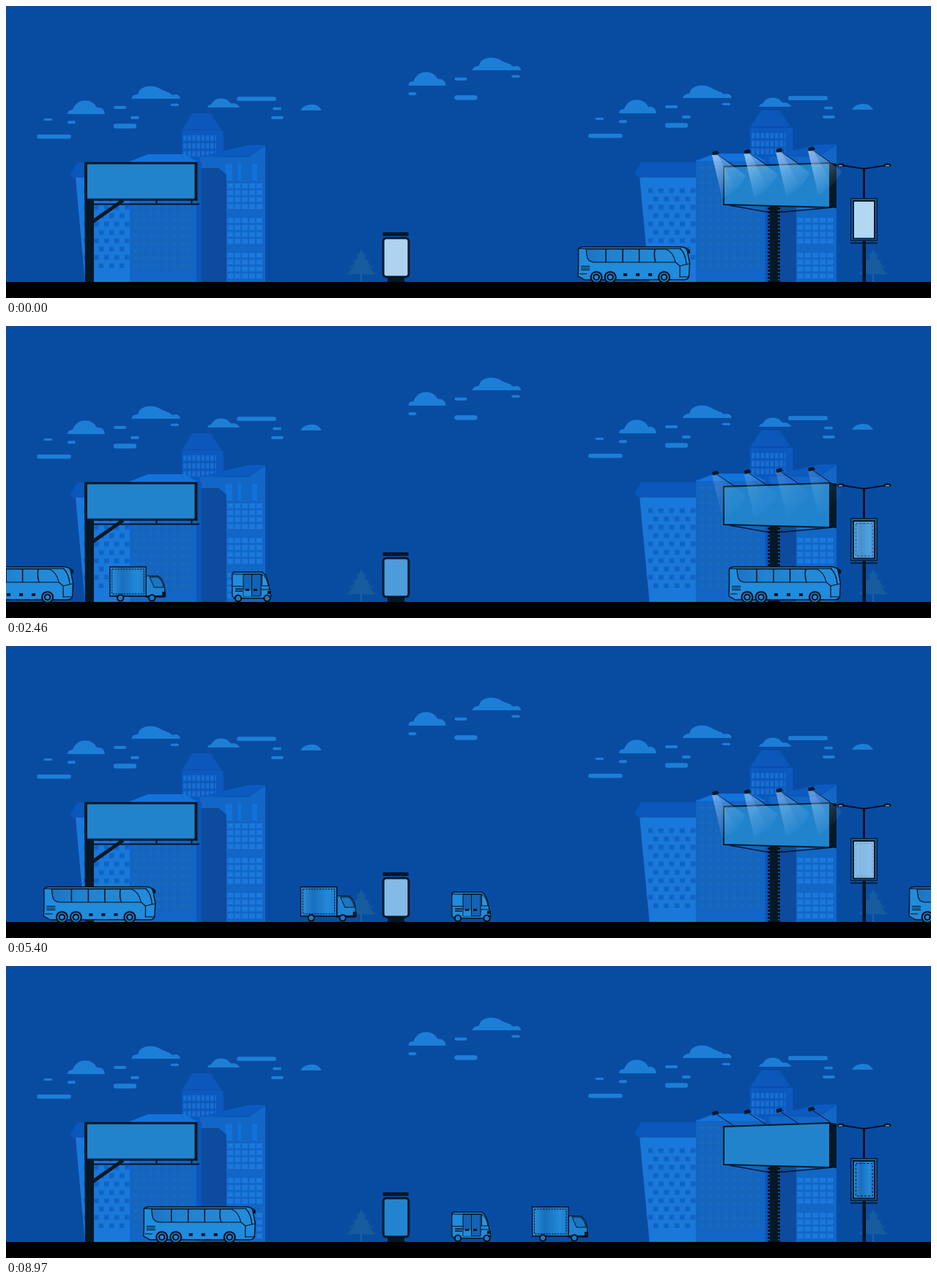
These frames come from a looping animation (1263 px wide and 400 px high, 9 s). An HTML page:

```html
<!DOCTYPE html>
<html lang="en">
<head>
<meta charset="utf-8">
<title>City street</title>
<style>
html, body { margin: 0; width: 100%; height: 100%; overflow: hidden; background: #084ca2; }
svg { display: block; width: 100vw; height: 100vh; }
.line { fill: none; stroke: #03111f; }
.dark { fill: #041825; }
</style>
</head>
<body>
<svg viewBox="0 0 1263 400">
<defs>
  <linearGradient id="panel">
    <stop offset="0" stop-color="#2a92e0"/><stop offset=".35" stop-color="#196fbd"/>
    <stop offset=".75" stop-color="#2389d8"/><stop offset="1" stop-color="#1d7ccb"/>
  </linearGradient>
  <linearGradient id="glass">
    <stop offset="0" stop-color="#1b74c3"/><stop offset=".3" stop-color="#1f82d2"/>
    <stop offset="1" stop-color="#238bdb"/>
  </linearGradient>
  <linearGradient id="ray" x1="0" y1="0" x2=".5" y2="1">
    <stop offset="0" stop-color="#d5ebff" stop-opacity=".48"/>
    <stop offset=".6" stop-color="#b5dcfa" stop-opacity=".2"/>
    <stop offset="1" stop-color="#a5d4f8" stop-opacity=".03"/>
  </linearGradient>
  <pattern id="stagger" x="106" y="250" width="14" height="22.800" patternUnits="userSpaceOnUse">
    <path d="M0 0h6.500v6.500H0zM7 11.400h6.500v6.500H7z" fill="#1163c3"/>
  </pattern>
  <pattern id="boxes" x="172" y="218" width="10.500" height="10.300" patternUnits="userSpaceOnUse">
    <path d="M.800 .800h7.600v6.600H.800z" fill="#1468c8" stroke="#1a64a8" stroke-width="1.100"/>
  </pattern>
  <pattern id="panes" x="301.500" y="242" width="9.900" height="9.500" patternUnits="userSpaceOnUse">
    <path d="M1 1h7.800v6.600H1z" fill="#1b79dc"/>
  </pattern>
  <pattern id="slits" x="242" y="177" width="6.200" height="10.800" patternUnits="userSpaceOnUse">
    <path d="M0 0h4.400v7.600H0z" fill="#186fd0"/>
  </pattern>

  <g id="puffs" fill="#1d7ed6">
    <path d="M84 148q0-6 7-6q5-12.500 17-12.500q11 0 16 9.500q10-1 11 9z"/>
    <path d="M171 127q2-6 9-6q2-9 13-11q12-1 20 5l10 4q3 2 4 3q9-3 11 5z"/>
  </g>
  <g id="dashes" stroke="#1d7ed6" stroke-linecap="round">
    <path d="M86 159.200h7M149 139h13" stroke-width="4"/>
    <path d="M150 164.500h25" stroke-width="6.300"/>
    <path d="M226.500 135.300h8" stroke-width="3.200"/>
  </g>
  <g id="sky">
    <use href="#puffs"/><use href="#dashes"/>
    <path fill="#1d7ed6" d="M275 139q1-4 5-4q4-8 13-8.500q10 0 14 7q9-1 12 5.500zM402 143q5-8 15-8q9-1 14 8z"/>
    <g stroke="#1d7ed6" stroke-linecap="round">
      <path d="M53.500 155.500h8" stroke-width="3.200"/>
      <path d="M172 153h8M366 140.700h8M364 153h13" stroke-width="3.800"/>
      <path d="M318 127.200h48M45 178.800h41" stroke-width="5.800"/>
    </g>
  </g>

  <g id="tower">
    <path fill="#0b58be" stroke="#0a4fae" d="M240 169.500h54l3 3v60h-57z"/>
    <path fill="#0b57bc" stroke="#094ca6" d="M240 169.500l14.500-23h25l14.500 23z"/>
    <path fill="url(#slits)" d="M242 177h45v30h-45z"/>
  </g>
  <g id="city">
    <path fill="#1a78da" d="M95 235h75v143h-62z"/>
    <path fill="#0b57ba" d="M97 214.500h73v20.500H92l-4-5z"/>
    <path fill="url(#stagger)" d="M106 250h63v110h-63z"/>
    <path fill="#0b5ac0" d="M265 206l66-15.500h23l-23 16z"/>
    <path fill="#1266c6" d="M265 207h66l23-16v187h-89z"/>
    <path fill="#1272da" d="M300 216h9v23h-9zM317 216h4v23h-4zM336 216h7v23h-7z"/>
    <path fill="url(#panes)" d="M301.500 242h49.500v37h-49.500zM301.500 289.500h49.500v37h-49.500zM301.500 337h49.500v37h-49.500z"/>
    <path fill="#0c4b9e" d="M267 222h23l11 9v147h-34z"/>
    <path fill="#0b56b7" d="M259 214h8v164h-8z"/>
    <path fill="#1265c6" d="M169 212h91v166h-91z"/>
    <path fill="#1273dc" d="M169 213l25-10h49l18 10z"/>
    <path fill="url(#boxes)" d="M172 218h84v144h-84z"/>
  </g>
  <g id="tree">
    <path fill="#155b9d" d="M0-45q2 6 8 10l-4 .500q3 5 9 7l-5 .500q3 5 10 7l-6 .500q3 6 10 9H-22q7-3 10-9l-6-.500q7-2 10-7l-5-.500q6-2 9-7l-4-.500q6-4 8-10z"/>
    <path stroke="#1c68a8" stroke-width="1.500" d="M0-11v11"/>
  </g>
  <g id="spot">
    <path class="dark" d="M-4-1l7-2 3 4-9 3z"/>
    <path class="line" d="M2 2l24 16"/>
  </g>
  <g id="beam" fill="url(#ray)">
    <path d="M-4 3h8l38 28q-10 22-32 32z"/>
    <path d="M-4 3h8l22 42q-6 14-16 18z" opacity=".7"/>
  </g>

  <g id="tyre">
    <circle r="8.600" fill="#06121e"/>
    <circle r="5.600" fill="none" stroke="#2389da" stroke-width="1.500"/>
    <circle r="2.700" fill="#2389da"/>
  </g>
  <g id="small">
    <circle r="5.200" fill="#06121e"/>
    <circle r="2.700" fill="#1b77c4" stroke="#2389da"/>
  </g>
  <g id="bus">
    <path fill="#218bdc" stroke="#04131f" stroke-width="1.400"
      d="M1.500 333q2-3 7-3h134q7 0 8 7l3 15-1 18q-1 5-7 5H10l-9-5 .500-14z"/>
    <path fill="url(#glass)" stroke="#04131f" stroke-width="1.200"
      d="M12 333h109q10 4 13 18H22q-8-1-9-9z"/>
    <path class="line" stroke-width="1.500" d="M39 333v18M62 333v18M84.500 333v18M106 333q-2 9 1 18"/>
    <path class="line" stroke-width="1.200"
      d="M2 332.500h140M134 351l6 5v16M140 356l13-3M140 332q8 7 9 22M145 331q8 0 8 7M5 356.500h12M5 359h12M5 361.500h12M3 367h10M140 371h13"/>
    <path class="dark" d="M63 366h5v4h-5zM80 366h5v4h-5zM97 366h5v4h-5zM151 334h3v5h-3z"/>
    <use href="#tyre" x="26" y="371.500"/><use href="#tyre" x="45" y="371.500"/><use href="#tyre" x="118.500" y="371.500"/>
  </g>
  <g id="truck">
    <path fill="#1f83d3" stroke="#04131f" stroke-width="1.200" d="M50 342.500h16q8 4 9.500 16v13H50z"/>
    <path fill="#1b75c2" stroke="#04131f" d="M55 344h11q6 4 8 14H61z"/>
    <path class="dark" d="M72 364h5v7h-5zM0 369h74v2H0z"/>
    <path fill="url(#panel)" stroke="#04131f" stroke-width="1.400" d="M.700 330h49.300v40H.700z"/>
    <path class="line" stroke-dasharray="2.500 1.300" d="M3.500 333h43.500v34H3.500z"/>
    <use href="#small" x="15" y="372.500"/><use href="#small" x="58" y="372.500"/>
  </g>
  <g id="rickshaw">
    <path fill="#218bdc" stroke="#04131f" stroke-width="1.300"
      d="M.700 341q0-4 4-4h37q7 5 9 18l2 9 1 6-4 3H4l-3-3z"/>
    <path fill="#1263b4" stroke="#04131f" d="M16 340h24v30H16z"/>
    <path fill="#218bdc" d="M16.500 362h11v8h-11z"/>
    <path class="line" d="M27.500 340v30M1 356.500h15M1 340h41M5 359.500h10M5 361.500h10M5 363.500h10M40 361h12"/>
    <path fill="#2c94df" stroke="#04131f" d="M41.500 340q7 5 8.500 16h-8.500z"/>
    <path class="dark" d="M19 360h5v3h-5zM30 360h5v3h-5zM49 363h5v4h-5z"/>
    <use href="#small" x="9" y="373"/><use href="#small" x="48.500" y="373"/>
  </g>
</defs>

<path fill="#084ca2" d="M0 0h1263v400H0z"/>
<use href="#sky"/>
<use href="#sky" x="753" y="-1"/>
<g transform="translate(465.500 -39)"><use href="#puffs"/><use href="#dashes"/></g>

<use href="#tower"/><use href="#city"/>
<use href="#tower" transform="translate(766 -6.500) scale(1.040 1.017)"/>
<use href="#city" transform="translate(766.500 -1.500) scale(1.038 1.004)"/>
<use href="#tree" x="485" y="378"/><use href="#tree" x="1184" y="378"/>

<!-- left billboard -->
<path class="dark" d="M107 214h5v52h8v112h-12z"/>
<path stroke="#041825" stroke-width="5" d="M119 295l41-29"/>
<path class="line" stroke-width="2" d="M119 271.500h145M205.500 266v5M253.500 266v5"/>
<path class="dark" d="M108 213.700h153.500v53H108z"/>
<path fill="#2283cd" d="M111 216.700h146.500v47H111z"/>

<!-- kiosk -->
<path class="dark" d="M514.500 310h35v5h-35zM521 371h23v7h-23z"/>
<rect x="515.200" y="318" width="34.600" height="53" rx="4" fill="#2284d1" stroke="#041825" stroke-width="3"/>
<rect class="lit" x="516.700" y="319.500" width="31.600" height="50" rx="2.500" fill="#aed2f0"/>

<!-- right billboard -->
<path class="dark" d="M1043 273h11v105h-11z"/>
<path class="line" stroke-width="3" stroke-dasharray="3 2" d="M1041.500 276v102M1055.500 276v102"/>
<path class="line" d="M988 273l50 9h24l66-6" stroke-width="1.300"/>
<path fill="#2283cd" stroke="#041825" stroke-width="2" d="M980 220l145-5v61l-145-4z"/>
<path class="dark" d="M1124.500 214.500l9.500 1.500v61l-9.500-1z"/>
<g id="spots"></g>
<g id="beams" class="lit"></g>

<!-- street lamp -->
<path class="line" stroke-width="2" d="M1137 217.500l34.500 5.500 35.500-5.500"/>
<path class="line" stroke-width="3" d="M1171.500 222v42"/>
<path class="line" stroke-width="4.500" d="M1171.700 321v57"/>
<ellipse cx="1140" cy="218" rx="5" ry="2.500" class="dark"/>
<ellipse cx="1203.500" cy="218" rx="5" ry="2.500" class="dark"/>
<path fill="#6aa5d5" d="M1137 218h5v1.500h-5zM1201 218h5v1.500h-5z"/>
<path class="line" stroke-width="1.500" d="M1153 324.800h37"/>
<path fill="#1769b8" stroke="#041a33" stroke-width="1.500" d="M1153.700 263.700h35.600v57.600h-35.600z"/>
<path fill="url(#panel)" stroke="#041825" stroke-width="2" d="M1157 267h29v51.500h-29z"/>
<path class="line" stroke-dasharray="3 2" d="M1160.500 270.500h22.500v44.500h-22.500z"/>
<path class="lit" fill="#bcddf6" fill-opacity=".94" d="M1158 268h27v49.500h-27z"/>

<path d="M0 378h1263v22H0z"/>
<use id="bus1" href="#bus"/><use id="bus2" href="#bus"/>
<use id="van" href="#truck"/><use id="taxi" href="#rickshaw"/>
</svg>

<script>
const LOOP = 9000;
const $ = id => document.getElementById(id);

for (let i = 0; i < 4; i++) {
  const place = `x="${968 + i * 43.7}" y="${201 - i * 1.8}"`;
  $('spots').innerHTML += `<use href="#spot" ${place}/>`;
  $('beams').innerHTML += `<use href="#beam" ${place}/>`;
}

// [time, brightness] of every lamp
const glow = [[0, 1], [1530, .2], [3360, .4], [4350, .24], [5400, .7], [7470, .65], [8970, 0], [9000, 0]];
const lit = document.querySelectorAll('.lit');

function brightness(t) {
  const i = glow.findIndex(key => key[0] > t);
  const [t0, a] = glow[i - 1], [t1, b] = glow[i];
  return a + (b - a) * (t - t0) / (t1 - t0);
}

const move = (id, x) => $(id).setAttribute('transform', `translate(${x.toFixed(2)} 0)`);

function draw(now) {
  const t = now % LOOP;
  move('bus1', 780 + t * .0837);
  move('bus2', -155.9 + t * .0382);
  move('van', -76.8 + t * .0886);
  move('taxi', -54 + 662 * Math.min(t / 4500, 1));
  const level = brightness(t);
  lit.forEach(el => el.setAttribute('opacity', level));
  requestAnimationFrame(draw);
}
draw(0);
</script>
</body>
</html>
```
